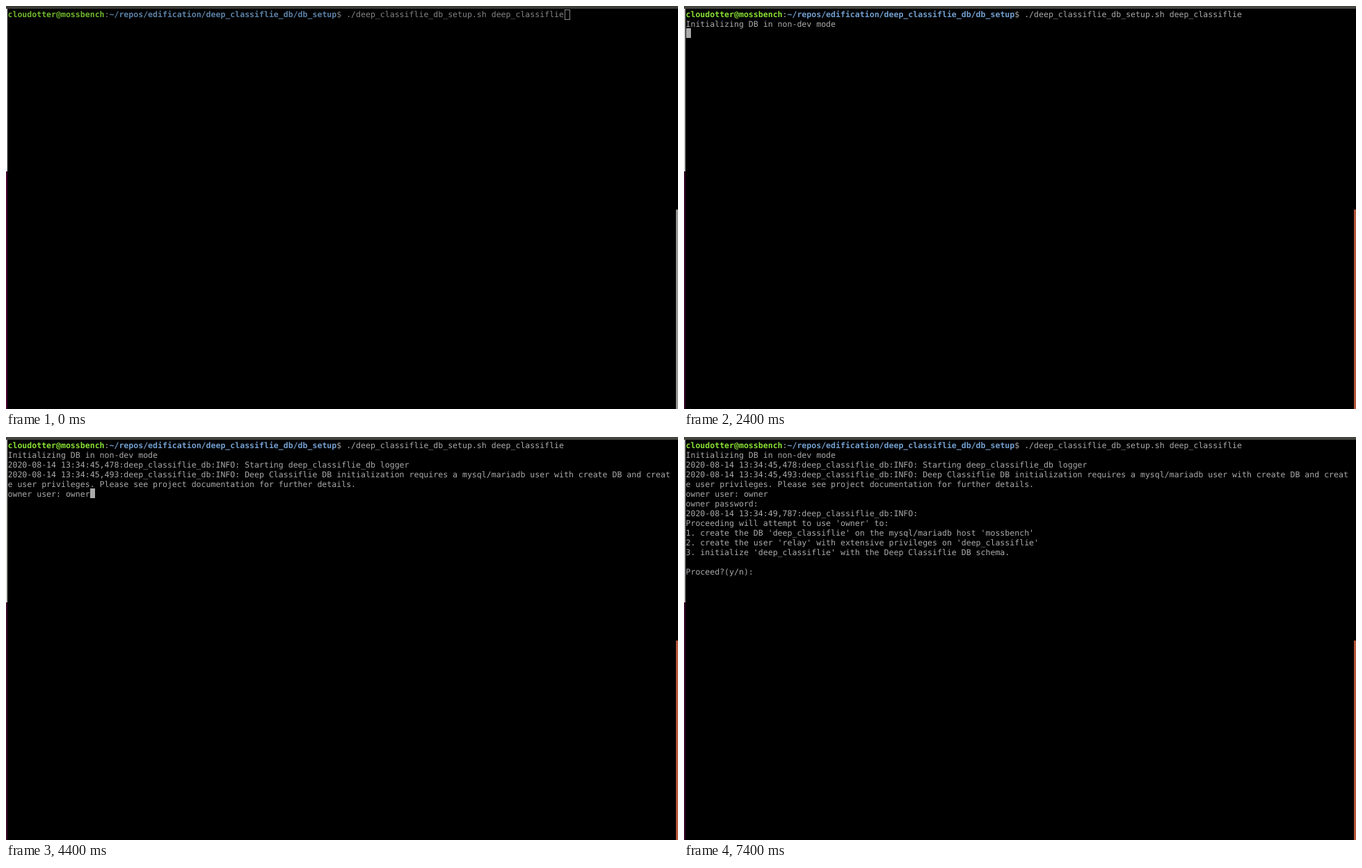
An HTML page for the animation above (8 s loop, 966 by 580 pixels).

```html
<!DOCTYPE html>
<html lang="en">
<head>
<meta charset="utf-8">
<title>Database setup</title>
<style>
  html, body { margin: 0; width: 100%; height: 100%; overflow: hidden; background: #000; }
  #stage {
    position: relative; width: 966px; height: 580px; overflow: hidden; background: #000;
    --text: #aaa; --user: #8ae234; --path: #729fcf;
    --frame: #45443f; --strip: #c6c6c4; --desk: #3b0a2d; --thumb: #b5573c;
  }
  #stage > * { position: absolute; }
  #top { left: 0; top: 0; width: 966px; height: 4px; background: var(--frame); }
  #strip { left: 0; top: 4px; width: 2px; height: 234px; background: var(--strip); }
  #desk { left: 0; top: 238px; width: 2px; height: 342px; background: var(--desk); }
  #thumb { left: 963px; top: 293px; width: 3px; height: 287px; background: var(--thumb); }
  #screen {
    left: 2.5px; top: 5px; margin: 0; color: var(--text); white-space: pre;
    font: 11.56px/14px "DejaVu Sans Mono", monospace; text-rendering: geometricPrecision;
  }
  b { color: var(--user); }
  b + b, .path { color: var(--path); }
  #cursor { width: 7px; height: 14px; box-sizing: border-box; background: var(--text); }
  #cursor.hollow { width: 8px; height: 15px; background: none; border: 1px solid var(--text); }
  #pointer { width: 5px; height: 11px; overflow: visible; }
</style>
</head>
<body>
<div id="stage">
  <div id="top"></div>
  <div id="strip"></div>
  <div id="desk"></div>
  <div id="thumb"></div>
  <div id="cursor"></div>
  <pre id="screen"><b id="user">cloudotter@mossbench</b>:<b class="path">~/repos/edification/deep_classiflie_db/db_setup</b>$ ./deep_classiflie_db_setup.sh deep_classiflie
<span id="output"></span></pre>
  <svg id="pointer" viewBox="0 0 5 11">
    <path d="M0 .5H2M3 .5H5M2.5 1V10M0 10.5H2M3 10.5H5" fill="none" stroke="#ddd"/>
  </svg>
</div>
<script>
const LOOP = 8000, COLUMN = 6.96, ROW = 14;
const $ = id => document.getElementById(id);

const intro = 'Initializing DB in non-dev mode\n';
const request = intro +
`2020-08-14 13:34:45,478:deep_classiflie_db:INFO: Starting deep_classiflie_db logger
2020-08-14 13:34:45,493:deep_classiflie_db:INFO: Deep Classiflie DB initialization requires a mysql/mariadb user with create DB and creat
e user privileges. Please see project documentation for further details.
owner user: `;
const password = request + 'owner\nowner password: ';
const confirm = password + `
2020-08-14 13:34:49,787:deep_classiflie_db:INFO:
Proceeding will attempt to use 'owner' to:
1. create the DB 'deep_classiflie' on the mysql/mariadb host 'mossbench'
2. create the user 'relay' with extensive privileges on 'deep_classiflie'
3. initialize 'deep_classiflie' with the Deep Classiflie DB schema.

Proceed?(y/n): `;

// Each step changes only the listed properties; focus runs from 0 to 1.
const steps = [
  [0, { output: '', cursor: true, focus: 0, pointer: null }],
  [500, { pointer: [938, 63] }],
  [600, { pointer: [938, 64] }],
  [800, { focus: 0.35, pointer: [919, 66] }],
  [900, { focus: 0.7, pointer: [903, 67] }],
  [1000, { focus: 1, pointer: [900, 67] }],
  [1200, { pointer: [899, 68] }],
  [2000, { cursor: false }],
  [2100, { cursor: true, pointer: null }],
  [2400, { output: intro }],
  [2500, { output: request }],
  [2700, { cursor: false }],
  [3300, { cursor: true }],
  [3900, { output: request + 'o' }],
  [4000, { output: request + 'ow' }],
  [4100, { output: request + 'owne' }],
  [4400, { output: request + 'owner' }],
  [4700, { output: password }],
  [5300, { cursor: false }],
  [5400, { cursor: true }],
  [6400, { cursor: false }],
  [6600, { cursor: true }],
  [6800, { output: confirm }],
  [7400, { cursor: false }]
];

// Colours without and with window focus.
const palette = {
  '--text': [[132, 132, 132], [170, 170, 170]],
  '--user': [[113, 184, 44], [138, 226, 52]],
  '--path': [[91, 128, 166], [114, 159, 207]],
  '--frame': [[60, 59, 55], [69, 68, 63]],
  '--strip': [[238, 238, 236], [198, 198, 196]],
  '--desk': [[74, 6, 54], [59, 10, 45]],
  '--thumb': [[150, 150, 147], [181, 87, 60]]
};
const mix = ([from, to], k) =>
  `rgb(${from.map((v, i) => Math.round(v + (to[i] - v) * k))})`;

function place(el, x, y) {
  el.style.left = x + 'px';
  el.style.top = y + 'px';
}

function show({ output, cursor, focus, pointer }) {
  for (const name in palette) $('stage').style.setProperty(name, mix(palette[name], focus));
  $('output').textContent = output;

  const lines = output.split('\n');
  const row = output ? lines.length : 0;
  const column = output ? lines.at(-1).length : 115;
  place($('cursor'), Math.round(2.5 + column * COLUMN), 4 + row * ROW + (row ? 0 : 1));
  $('cursor').className = focus ? '' : 'hollow';
  $('cursor').style.visibility = cursor ? 'visible' : 'hidden';

  $('pointer').style.visibility = pointer ? 'visible' : 'hidden';
  if (pointer) place($('pointer'), ...pointer);
}

let shown = -1;
function tick() {
  const time = performance.now() % LOOP;
  const index = steps.findLastIndex(([start]) => start <= time);
  if (index !== shown) {
    shown = index;
    show(Object.assign({}, ...steps.slice(0, index + 1).map(step => step[1])));
  }
  requestAnimationFrame(tick);
}
tick();
</script>
</body>
</html>
```
